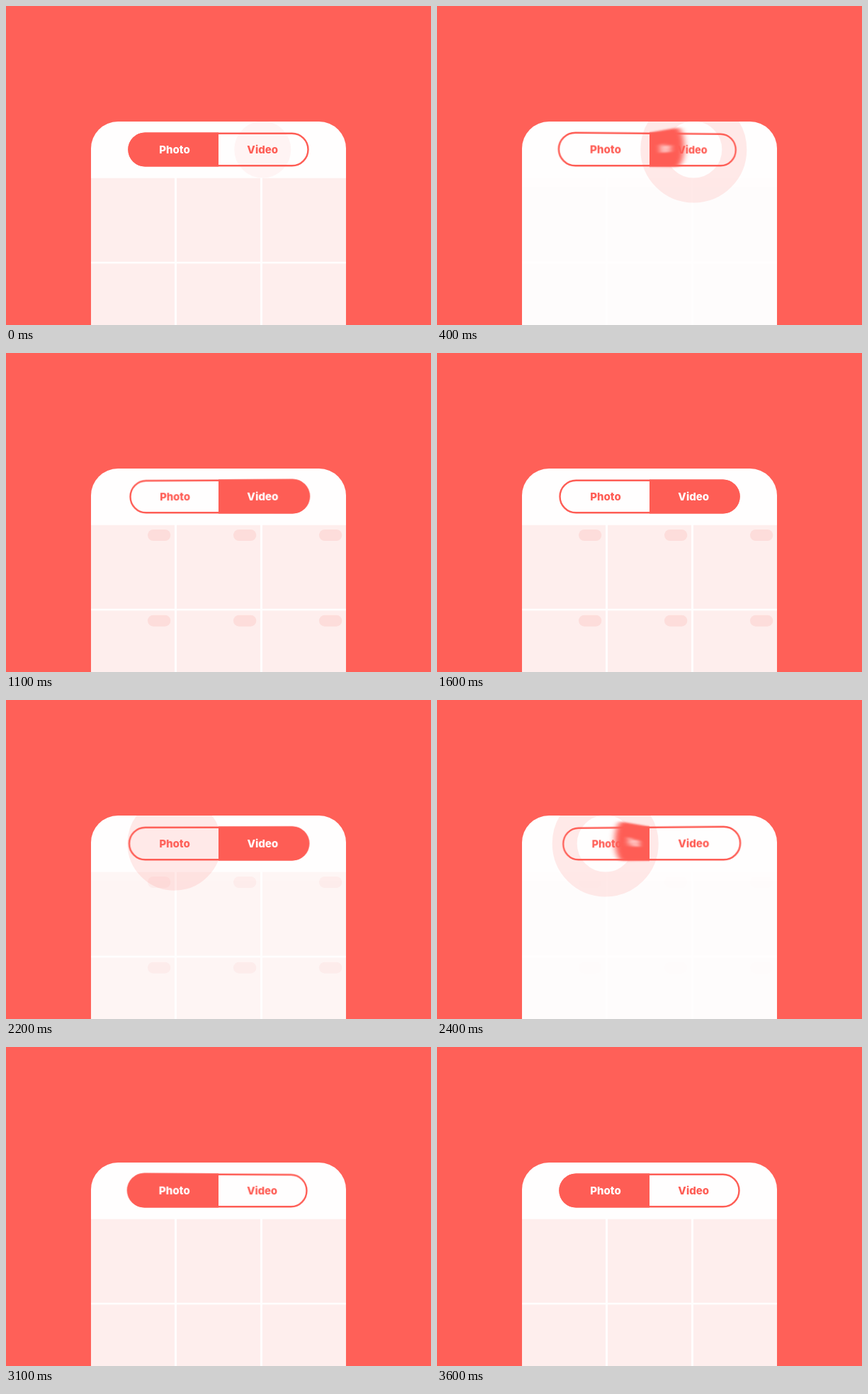
Recreate the animation shown at these times as an HTML page. Size 600 px wide and 450 px high, loop 4 s.

```html
<!DOCTYPE html>
<html lang="en">
<head>
<meta charset="utf-8">
<title>Photo / Video switch</title>
<style>
  html, body { margin: 0; width: 100%; height: 100%; overflow: hidden; background: #ff6058; }
  svg { position: absolute; left: 0; top: 0; width: 600px; height: 450px; }
  .turn { transform-origin: 300px 225px; }
  #left { clip-path: inset(0 300px 0 0); }
  #right { clip-path: inset(0 0 0 300px); }
  text { font: 800 15px Inter, Lato, sans-serif; text-anchor: middle; }
  .red { fill: #fe5d55; }
  .white { fill: #fffefe; }
</style>
</head>
<body>
<svg viewBox="0 0 600 450">
  <defs>
    <clipPath id="panel"><rect x="120" y="163" width="360" height="400" rx="38"/></clipPath>
  </defs>
  <g clip-path="url(#panel)">
    <rect class="white" x="120" y="163" width="360" height="287"/>
    <g id="grid"><g id="cells" fill="#feeeed"/><g id="tags" fill="#fddddb"/></g>
    <circle id="ripple" cy="202.5" fill="none" stroke="#fe5d55"/>
  </g>
</svg>

<svg id="base" class="turn" viewBox="0 0 600 450">
  <rect x="173.5" y="179.75" width="253" height="45.5" rx="22.75" fill="none" stroke="#fe5d55" stroke-width="2.4"/>
  <text class="red" x="238" y="208">Photo</text>
  <text class="red" x="362.2" y="208">Video</text>
</svg>

<!-- Each face runs past the hinge so that its blur stays solid there. -->
<svg id="left" class="turn" viewBox="0 0 600 450">
  <defs>
    <filter id="blur" filterUnits="userSpaceOnUse" x="0" y="100" width="600" height="200" color-interpolation-filters="sRGB">
      <feGaussianBlur id="amount" stdDeviation="0"/>
    </filter>
  </defs>
  <g class="face">
    <path class="red" d="M370 178.5H196.3a24 24 0 0 0 0 48H370z"/>
    <text class="white" x="238" y="208">Photo</text>
  </g>
</svg>
<svg id="right" class="turn" viewBox="0 0 600 450">
  <g class="face">
    <path class="red" d="M230 178.5H403.7a24 24 0 0 1 0 48H230z"/>
    <text class="white" x="362.2" y="208">Video</text>
  </g>
</svg>

<script>
const HALF = 2000, STEP = 100;
const FLIP_START = 180, FLIP_LENGTH = 424;
const $ = id => document.getElementById(id);
const faces = document.querySelectorAll('.face');

const clamp = v => Math.min(1, Math.max(0, v));
const ramp = (t, from, to) => clamp((t - from) / (to - from));
const sine = u => (1 - Math.cos(Math.PI * u)) / 2;
const cubic = u => u < 0.5 ? 4 * u ** 3 : 1 - 4 * (1 - u) ** 3;
const rad = deg => deg * Math.PI / 180;

function addRect(parent, x, y, width, height, rx) {
  const rect = document.createElementNS('http://www.w3.org/2000/svg', 'rect');
  for (const [name, value] of Object.entries({ x, y, width, height, rx })) rect.setAttribute(name, value);
  parent.append(rect);
}

for (let row = 0; row < 2; row++) {
  for (let col = 0; col < 3; col++) {
    const x = 120 + col * 121, y = 242.7 + row * 120.7;
    addRect($('cells'), x, y, 118, 118, 0);
    addRect($('tags'), x + 80, y + 6.3, 32.3, 16, 8);
  }
}

// The plate leans away under the landing flap, then swings back and settles.
function lean(t) {
  if (t < 600) return 14 * sine(ramp(t, 100, 600));
  if (t < 1200) return 14 - 20 * sine(ramp(t, 600, 1200));
  return -6 + 6 * sine(ramp(t, 1200, 1600));
}

function turn(id, angle) {
  $(id).style.transform = `perspective(800px) rotateY(${angle.toFixed(3)}deg)`;
}

function drawFlap(t, toVideo) {
  const u = ramp(t, FLIP_START, FLIP_START + FLIP_LENGTH);
  const done = cubic(u);
  const flap = 180 * (toVideo ? done : 1 - done);
  const tilt = lean(t) * (toVideo ? 1 : -1);

  turn('base', tilt);
  turn('left', tilt + flap);
  turn('right', tilt + flap - 180);
  const leftShown = Math.cos(rad(tilt + flap)) > 0;
  $('left').style.visibility = leftShown ? 'visible' : 'hidden';
  $('right').style.visibility = leftShown ? 'hidden' : 'visible';

  const speed = 12 * Math.min(u, 1 - u) ** 2;
  const blur = 3.6 * speed * Math.sin(rad(flap));
  $('amount').setAttribute('stdDeviation', `${blur.toFixed(2)} ${(blur / 10).toFixed(2)}`);
  for (const face of faces) {
    if (blur > 0.1) face.setAttribute('filter', 'url(#blur)');
    else face.removeAttribute('filter');
  }
}

function drawRipple(t, toVideo) {
  const outer = 40 + 35 * (1 - (1 - ramp(t, 0, 400)) ** 2);
  const inner = 75 * ramp(t, 200, 575);
  const ripple = $('ripple');
  ripple.setAttribute('cx', toVideo ? 362.3 : 237.7);
  ripple.setAttribute('r', (outer + inner) / 2);
  ripple.setAttribute('stroke-width', outer - inner);
  ripple.setAttribute('opacity', inner < outer ? 0.06 + 0.07 * ramp(t, 0, 200) : 0);
}

function drawGrid(t, toVideo) {
  const leaving = t < 450;
  $('grid').setAttribute('opacity', leaving ? 1 - ramp(t, 0, 430) : ramp(t, 500, 800));
  $('tags').setAttribute('visibility', leaving !== toVideo ? 'visible' : 'hidden');
}

function draw(time) {
  const t = time % HALF;
  const toVideo = time % (2 * HALF) < HALF;
  drawGrid(t, toVideo);
  drawRipple(t, toVideo);
  drawFlap(t, toVideo);
}

// Ten poses a second.
function tick() {
  draw(Math.floor((performance.now() + 10) / STEP) * STEP);
  requestAnimationFrame(tick);
}
tick();
</script>
</body>
</html>
```
